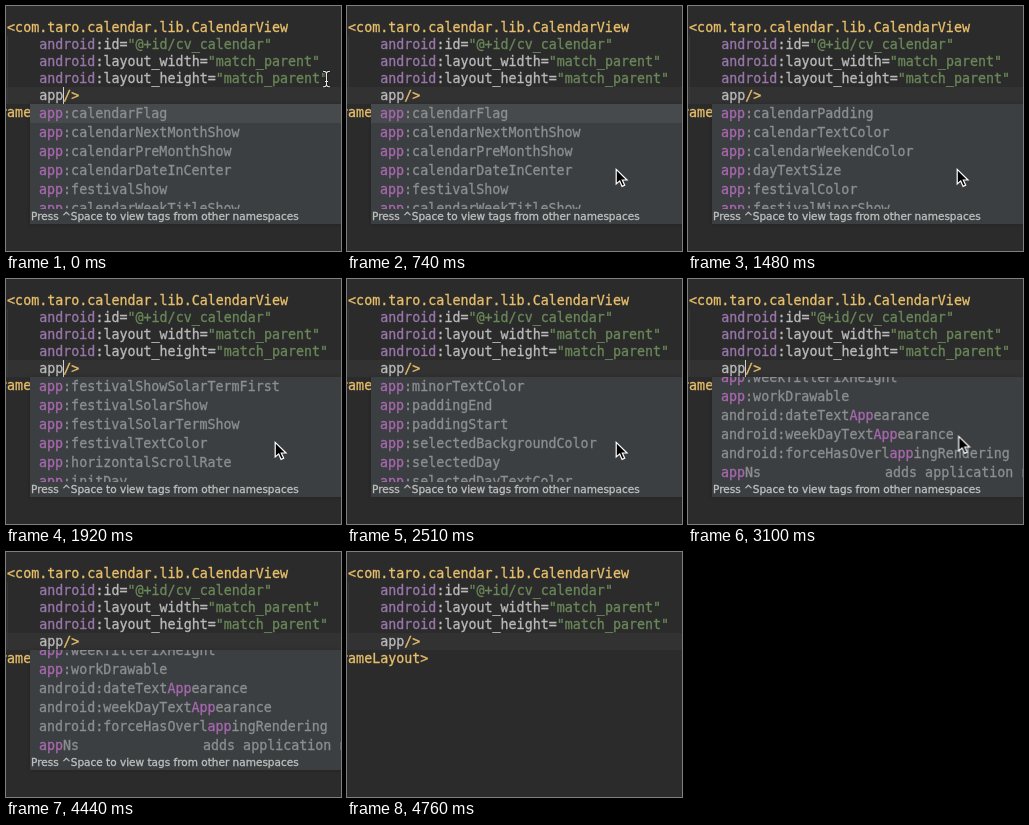
These frames come from a looping animation (335 by 245 pixels, 5060 ms). An HTML page:

```html
<!DOCTYPE html>
<html lang="en">
<head>
<meta charset="utf-8">
<title>XML attribute completion</title>
<style>
  html, body { margin: 0; width: 100%; height: 100%; overflow: hidden; background: #2b2b2b; }

  .stage {
    position: relative; width: 335px; height: 245px; overflow: hidden;
    background: #2b2b2b; color: #bababa; white-space: pre;
    font: 13.33px/17px "DejaVu Sans Mono", "Liberation Mono", monospace;
    -webkit-text-stroke-width: .3px;
  }
  .stage > * { position: absolute; }
  .current { left: 0; top: 81px; width: 100%; height: 17px; background: #323232; }
  .guide { left: 1px; top: 30px; width: 1px; height: 68px; background: #373737; }
  .code { left: -31px; top: 13px; }
  .tag { color: #e8bf6a; }
  .ns { color: #9876aa; }
  .str { color: #6a8759; }
  .caret { left: 56.6px; top: 81px; width: 1.3px; height: 17px; background: #d0d0d0; }

  .popup {
    left: 24px; top: 98px; width: 330px; height: 120px;
    background: #3c3f41; box-shadow: 0 0 4px rgba(0, 0, 0, .2);
  }
  .view { height: 105px; overflow: hidden; }
  .row { position: relative; height: 19px; padding-left: 9px; line-height: 19px; color: #8c8e90; }
  .row:first-child { background: #464a4c; }
  .row b { font-weight: normal; color: #a768ae; }
  .note { position: absolute; left: 173px; }
  .hint {
    height: 15px; padding-left: 1px; color: #c0c0c0;
    font: 10.5px/15px "DejaVu Sans", Verdana, sans-serif;
  }
  .cursor { left: 0; top: 0; overflow: visible; }

  .caret, .popup, .list, .cursor { animation: 5060ms step-end infinite; }
  .caret { animation-name: blink; }
  .popup { animation-name: close; }
  .list { animation-name: scroll; }
  .arrow { animation-name: point; }
  .beam { animation-name: beam; }

  @keyframes blink {
    0%, 17.58%, 37.94%, 55.33%, 75.88% { opacity: 1; }
    8.69%, 26.28%, 46.83%, 67.19%, 87.74%, 100% { opacity: 0; }
  }
  @keyframes close {
    0% { visibility: visible; }
    94.07%, 100% { visibility: hidden; }
  }
  /* whole rows of 19px, then flush with the end of the list */
  @keyframes scroll {
    0% { transform: translateY(0); }
    17.58% { transform: translateY(calc(-19px * 3)); }
    20.55% { transform: translateY(calc(-19px * 6)); }
    23.32% { transform: translateY(calc(-19px * 8)); }
    26.28% { transform: translateY(calc(-19px * 10)); }
    29.24% { transform: translateY(calc(-19px * 12)); }
    32.01% { transform: translateY(calc(-19px * 14)); }
    34.98% { transform: translateY(calc(-19px * 16)); }
    37.94% { transform: translateY(calc(-19px * 18)); }
    43.87% { transform: translateY(calc(-19px * 20)); }
    46.83% { transform: translateY(calc(-19px * 22)); }
    49.60% { transform: translateY(calc(-19px * 24)); }
    52.56% { transform: translateY(calc(-19px * 27)); }
    61.26%, 100% { transform: translateY(calc(105px - 100%)); }
  }
  @keyframes point {
    0% { opacity: 0; transform: translate(298px, 97px); }
    8.69% { opacity: 1; transform: translate(298px, 97px); }
    11.66% { opacity: 1; transform: translate(284px, 136px); }
    14.62% { opacity: 1; transform: translate(268px, 162px); }
    52.56% { opacity: 1; transform: translate(268px, 159px); }
    55.33% { opacity: 1; transform: translate(269.5px, 156px); }
    70.15% { opacity: 0; transform: translate(276px, 194px); }
    78.85% { opacity: 1; transform: translate(276px, 194px); }
    81.81%, 100% { opacity: 0; transform: translate(276px, 194px); }
  }
  @keyframes beam {
    0% { opacity: 1; transform: translate(316px, 64px); }
    8.69% { opacity: 0; transform: translate(265px, 210px); }
    75.88% { opacity: 1; transform: translate(265px, 210px); }
    78.85%, 100% { opacity: 0; transform: translate(265px, 210px); }
  }
</style>
</head>
<body>
<div class="stage">
  <div class="current"></div>
  <div class="guide"></div>
  <div class="code"><span class="tag">    &lt;com.taro.calendar.lib.CalendarView</span>
        <span class="ns">android</span>:id=<span class="str">"@+id/cv_calendar"</span>
        <span class="ns">android</span>:layout_width=<span class="str">"match_parent"</span>
        <span class="ns">android</span>:layout_height=<span class="str">"match_parent"</span>
        app<span class="tag">/&gt;</span>
<span class="tag">&lt;/FrameLayout&gt;</span></div>
  <div class="caret"></div>
  <div class="popup"><div class="view"><div class="list"></div></div><div class="hint">Press ^Space to view tags from other namespaces</div></div>
  <svg class="cursor beam" width="9" height="18" fill="none">
    <defs><path id="ibeam" d="M1 1.2Q4.2 1.2 4.5 3.2V14.8Q4.2 16.8 1 16.8M8 1.2Q4.8 1.2 4.5 3.2M8 16.8Q4.8 16.8 4.5 14.8M3 11.5H6"/></defs>
    <use href="#ibeam" stroke="#111" stroke-width="2.4"/>
    <use href="#ibeam" stroke="#e8e8e8" stroke-width="1.1"/>
  </svg>
  <svg class="cursor arrow" width="13" height="20">
    <path d="M1.2 1.4V16L4.7 12.9L7.1 18.4L9.7 17.3L7.3 12H12Z" fill="#000" stroke="#fff" stroke-width="1.2"/>
  </svg>
</div>
<script>
  const attrs = `calendarFlag calendarNextMonthShow calendarPreMonthShow calendarDateInCenter
    festivalShow calendarWeekTitleShow calendarLunarDateShow festivalLunarShow backgroundColor
    bottomDrawable calendarMinorFestivalColor calendarMinorWeekendColor calendarPadding
    calendarTextColor calendarWeekendColor dayTextSize festivalColor festivalMinorShow
    festivalShowSolarTermFirst festivalSolarShow festivalSolarTermShow festivalTextColor
    horizontalScrollRate initDay minorTextColor paddingEnd paddingStart selectedBackgroundColor
    selectedDay selectedDayTextColor todayDrawable weekTextColor weekTitleFixHeight
    workDrawable`.split(/\s+/).map(name => "app:" + name);
  const inherited = ["dateTextAppearance", "weekDayTextAppearance", "forceHasOverlappingRendering"]
    .map(name => "android:" + name);

  const row = (text, note = "") =>
    `<div class="row">${text.replace(/app/i, "<b>$&</b>")}<span class="note">${note}</span></div>`;

  document.querySelector(".list").innerHTML =
    [...attrs, ...inherited].map(text => row(text)).join("") +
    row("appNs", "adds application namespace");
</script>
</body>
</html>
```
